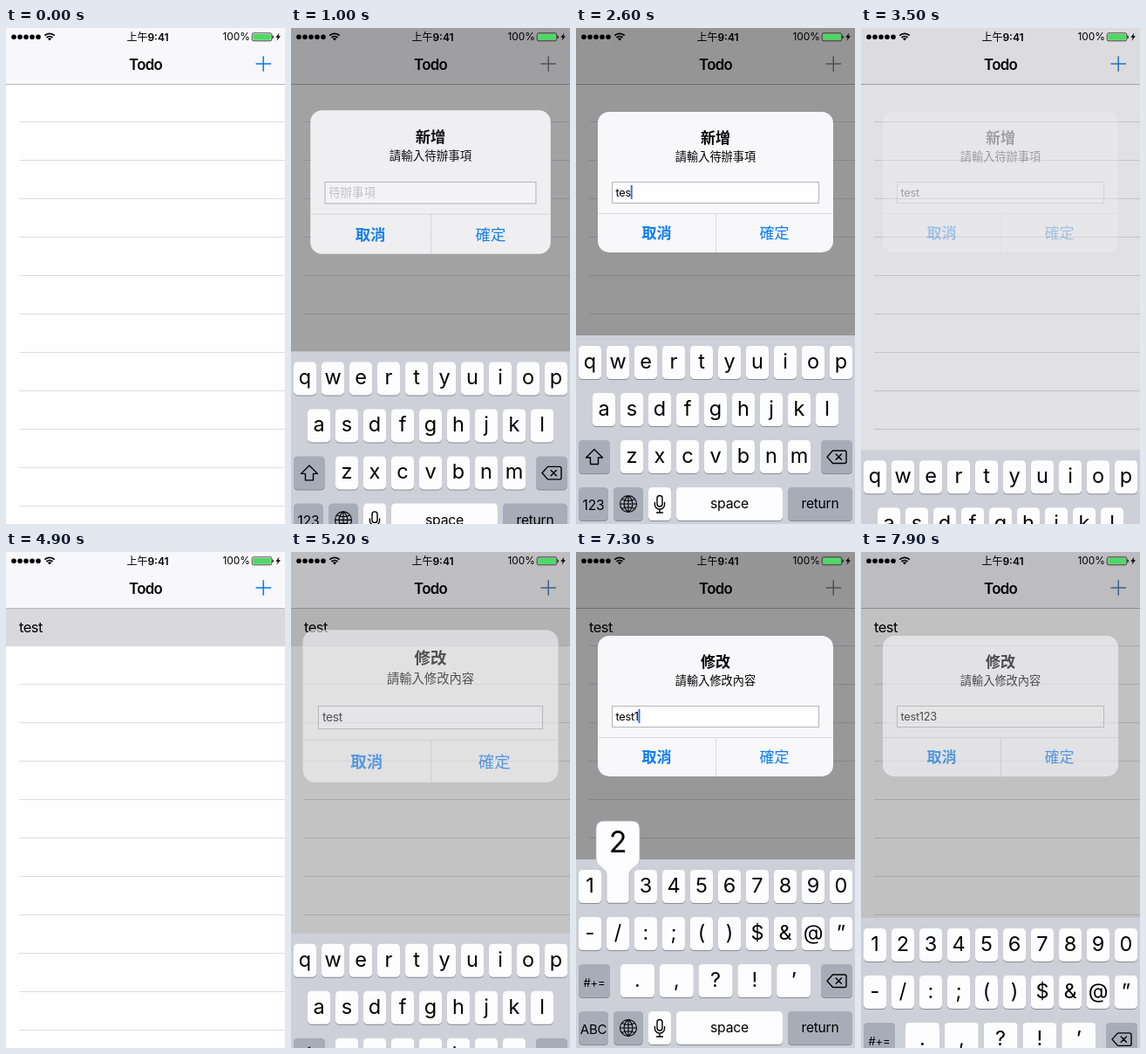
Animation, 320 px wide and 568 px high, one loop 8 s. Source, as an HTML page:

```html
<!DOCTYPE html>
<html lang="zh-Hant">
<head>
<meta charset="utf-8">
<title>Todo</title>
<style>
html, body { margin: 0; width: 100%; height: 100%; overflow: hidden; background: #fefdff; }
svg { display: block; width: 100%; height: 100%; font-family: Inter, "Noto Sans CJK TC", "Noto Sans CJK", sans-serif; }
text { white-space: pre; }
.mid { text-anchor: middle; }
.line { fill: none; stroke: #000; stroke-width: 1.4; stroke-linejoin: round; stroke-linecap: round; }
</style>
</head>
<body>
<svg id="stage" viewBox="0 0 320 568" xmlns="http://www.w3.org/2000/svg">
  <rect width="320" height="568" fill="#fefdff"/>
  <g id="lines" fill="#dddce0"></g>
  <rect id="rowGlow" y="64" width="320" height="44" fill="#d9d8da"/>
  <text id="rowText" x="15" y="92" font-size="16.5" letter-spacing="-.5">test</text>

  <rect width="320" height="64" fill="#f8f7f9"/>
  <rect y="64" width="320" height="1" fill="#b9b8bb"/>
  <text class="mid" x="160" y="48" font-size="16.8" font-weight="600" letter-spacing="-.7">Todo</text>
  <path id="plus" d="M286.5 41H304M295.2 32.2V49.8" fill="none" stroke-width="1.5"/>

  <rect id="dim" width="320" height="568"/>

  <g id="status">
    <g id="dots"></g>
    <g fill="none" stroke="#000" stroke-width="1.8">
      <path d="M44.3 8.7A8.2 8.2 0 0 1 55.7 8.7M46.5 11A5 5 0 0 1 53.5 11"/>
    </g>
    <path d="M50 14.4L47.9 12.3A3 3 0 0 1 52.1 12.3Z"/>
    <text class="mid" x="162.5" y="14.5" font-size="12" font-weight="600"><tspan font-weight="500">上午</tspan>9:41</text>
    <text x="248.6" y="14.4" font-size="11.9" letter-spacing="-.1">100%</text>
    <rect x="282.2" y="5.8" width="22.6" height="9" rx="1.8" fill="none" stroke="#333" stroke-width=".9"/>
    <rect x="283.3" y="6.9" width="20.4" height="6.8" rx=".8" fill="#4cd964"/>
    <path d="M305.7 8.6A2 2 0 0 1 305.7 12Z" stroke="#333" stroke-width=".6"/>
    <path d="M313.4 5.6L309.3 10.8H311.7L310.5 14.8L314.9 9.3H312.4Z"/>
  </g>

  <g id="alert">
    <clipPath id="card"><rect x="25" y="96" width="270" height="161" rx="13"/></clipPath>
    <rect x="25" y="96" width="270" height="161" rx="13" fill="#f8f7f9"/>
    <rect id="pressed" x="160" y="212" width="135" height="45" fill="#e2e1e5" clip-path="url(#card)"/>
    <text id="title" class="mid" x="160" y="132.2" font-size="17" font-weight="600"></text>
    <text id="message" class="mid" x="160" y="152" font-size="13.2"></text>
    <rect x="41.5" y="176.5" width="237" height="24" fill="#fefdff" stroke="#b5b4b8"/>
    <text id="hint" x="45.5" y="193" font-size="13.2" fill="#c5c4ca">待辦事項</text>
    <text id="entry" x="45.6" y="192.6" font-size="12.8" letter-spacing="-.3"></text>
    <rect id="caret" y="180" width="2" height="16" fill="#4470e6"/>
    <path d="M25 212.5H295M160.5 212V257" stroke="#dad9dd" fill="none"/>
    <g class="mid" font-size="17" fill="#087cf0">
      <text x="92.5" y="241.4" font-weight="600">取消</text>
      <text x="227.5" y="241.4">確定</text>
    </g>
  </g>

  <g id="board">
    <rect y="352" width="320" height="217" fill="#cdd0d8"/>
    <g id="letters"></g>
    <g id="digits"></g>
    <g id="common"></g>
    <g id="popup">
      <path id="bubble" fill="#fdfcfe" stroke="#a9acb3" stroke-width=".7"/>
      <text id="big" class="mid" font-size="34"></text>
    </g>
  </g>
</svg>
<script>
const $ = id => document.getElementById(id);
const LOOP = 8000;
const WHITE = '#fdfcfe', GRAY = '#a6adb9';

const sheets = [
  { open: 760, close: 3399, title: '新增', message: '請輸入待辦事項', text: '' },
  { open: 5080, close: 7845, title: '修改', message: '請輸入修改內容', text: 'test' }
];
const taps = [
  ['t', 1900, 2000], ['e', 2200, 2300], ['s', 2400, 2580], ['t', 2800, 2950],
  ['1', 6900, 7050], ['2', 7200, 7350], ['3', 7550, 7700]
];
const blinks = [[1350, 1540, 1560, 1720], [5620, 5820, 6080, 6290]];

function add(parent, tag, attrs, text) {
  const el = document.createElementNS('http://www.w3.org/2000/svg', tag);
  for (const k in attrs) el.setAttribute(k, attrs[k]);
  if (text) el.textContent = text;
  parent.append(el);
  return el;
}
const put = (el, attrs) => { for (const k in attrs) el.setAttribute(k, attrs[k]); };
const show = (el, on) => { el.style.display = on ? '' : 'none'; };
const within = (t, a, b) => t >= a && t < b;
const ramp = (t, a, b) => Math.min(1, Math.max(0, (t - a) / (b - a)));

// Critically damped spring, time in ms and rate per second
function spring(ms, rate) {
  const x = Math.max(0, ms) * rate / 1000;
  return 1 - (1 + x) * Math.exp(-x);
}

// Static list and status parts
for (let y = 107; y < 568; y += 44) add($('lines'), 'rect', { x: 15, y, width: 305, height: 1 });
for (let i = 0; i < 5; i++) add($('dots'), 'circle', { cx: 9 + 7 * i, cy: 10.2, r: 2.8 });

// Keyboard
const keys = {};
function cap(parent, x, y, w, fill = WHITE) {
  add(parent, 'rect', { x, y: y + 1, width: w, height: 38, rx: 4.5, fill: '#888b92' });
  add(parent, 'rect', { x, y, width: w, height: 38, rx: 4.5, fill });
}
function label(parent, text, x, y, size, spacing = 0) {
  add(parent, 'text', { class: 'mid', x, y, 'font-size': size, 'letter-spacing': spacing }, text);
}
function keyRow(parent, chars, x, y, w = 26, step = 32) {
  [...chars].forEach((c, i) => {
    const left = x + step * i;
    keys[c] = { x: left, y, w };
    cap(parent, left, y, w);
    label(parent, c, left + w / 2, y + 26, 23.5);
  });
}
function sideKey(parent, text, y, w, size) {
  cap(parent, 3, y, w, GRAY);
  label(parent, text, 3 + w / 2, y + 25.8, size, -.2);
}

const letters = $('letters'), digits = $('digits'), common = $('common');
keyRow(letters, 'qwertyuiop', 3, 364);
keyRow(letters, 'asdfghjkl', 19, 418);
keyRow(letters, 'zxcvbnm', 51, 472);
cap(letters, 3, 472, 36, GRAY);
add(letters, 'path', { class: 'line', d: 'M21 482.5L30.5 492H25.5V499.5H16.5V492H11.5Z' });
sideKey(letters, '123', 526, 34, 15.6);

keyRow(digits, '1234567890', 3, 364);
keyRow(digits, '-/:;()$&@”', 3, 418);
keyRow(digits, '.,?!’', 51, 472, 39, 44.8);
sideKey(digits, '#+=', 472, 36, 13);
sideKey(digits, 'ABC', 526, 34, 15);

cap(common, 281, 472, 36, GRAY);
add(common, 'path', { class: 'line', d: 'M294.5 484H308Q310 484 310 486V496.5Q310 498.5 308 498.5H294.5L288 491.2ZM298.2 488L304.4 494.3M304.4 488L298.2 494.3' });
cap(common, 43, 526, 34, GRAY);
add(common, 'path', { class: 'line', 'stroke-width': 1, style: 'stroke-width:1.1', d: 'M50.5 545a9.5 9.5 0 1 0 19 0a9.5 9.5 0 1 0 -19 0H69.5M60 535.5V554.5M60 535.5C53.5 541 53.5 549 60 554.5C66.5 549 66.5 541 60 535.5M52.5 539.5Q60 543 67.5 539.5M52.5 550.5Q60 547 67.5 550.5' });
cap(common, 83, 526, 26);
add(common, 'rect', { class: 'line', x: 93, y: 535.5, width: 6, height: 12.5, rx: 3 });
add(common, 'path', { class: 'line', d: 'M90.4 543.5V545.5A5.6 5.6 0 0 0 101.6 545.5V543.5M96 551.3V555M92.5 555H99.5' });
cap(common, 115, 526, 122);
label(common, 'space', 176, 550.3, 15.8, -.25);
cap(common, 243, 526, 74, GRAY);
label(common, 'return', 280, 550.3, 15.6, -.25);

function drawPopup(tap) {
  show($('popup'), tap);
  if (!tap) return;
  const { x, y, w } = keys[tap[0]];
  const l = Math.max(1.5, x - 12), r = x + w + 12, top = y - 56, low = y - 12;
  put($('bubble'), { d: `M${l + 9} ${top}H${r - 9}Q${r} ${top} ${r} ${top + 9}V${low}C${r} ${low + 9} ${x + w} ${low + 9} ${x + w} ${y + 6}V${y + 33}Q${x + w} ${y + 38} ${x + w - 5} ${y + 38}H${x + 5}Q${x} ${y + 38} ${x} ${y + 33}V${y + 6}C${x} ${low + 9} ${l} ${low + 9} ${l} ${low}V${top + 9}Q${l} ${top} ${l + 9} ${top}Z` });
  $('big').textContent = tap[0];
  put($('big'), { x: (l + r) / 2, y: y - 20 });
}

function drawCaret(t, sheet) {
  let alpha = within(t, sheet.open + 350, sheet.close - 5) ? 1 : 0;
  for (const [a, b, c, d] of blinks) alpha *= 1 - ramp(t, a, b) + ramp(t, c, d);
  const width = $('entry').textContent ? $('entry').getComputedTextLength() : 0;
  put($('caret'), { x: 45.3 + width, opacity: alpha });
}

function render(t) {
  const sheet = sheets[t < 4500 ? 0 : 1];
  const level = (rateIn, rateOut) => spring(t - sheet.open, rateIn) * (1 - spring(t - sheet.close, rateOut));
  const fade = level(16, 24.5);

  show($('rowText'), t >= 3850);
  put($('rowGlow'), { opacity: t < 4900 ? 0 : 1 - ramp(t, 5100, 5350) });
  const mix = (a, b) => Math.round(a + (b - a) * fade);
  put($('plus'), {
    stroke: `rgb(${mix(0, 135)},${mix(122, 134)},${mix(255, 138)})`,
    opacity: within(t, 690, 800) ? .35 : 1
  });
  put($('dim'), { opacity: .4 * fade });

  const grow = 1.2 - .2 * spring(t - sheet.open, 16);
  put($('alert'), { opacity: fade, transform: `translate(160 176.5) scale(${grow}) translate(-160 -176.5)` });
  show($('alert'), fade > .002);
  show($('pressed'), within(t, 3380, 3425) || within(t, 7780, 7840));
  $('title').textContent = sheet.title;
  $('message').textContent = sheet.message;
  const typed = taps.filter(p => p[1] > sheet.open && p[2] <= t && p[2] < sheet.close).map(p => p[0]).join('');
  $('entry').textContent = sheet.text + typed;
  show($('hint'), !(sheet.text + typed));
  drawCaret(t, sheet);

  put($('board'), { transform: `translate(0 ${217 * (1 - level(17, 20))})` });
  show(letters, t < 6500);
  show(digits, t >= 6500);
  drawPopup(taps.find(p => within(t, p[1], p[2])));
}

const start = performance.now();
function tick() {
  render((performance.now() - start) % LOOP);
  requestAnimationFrame(tick);
}
tick();
</script>
</body>
</html>
```
